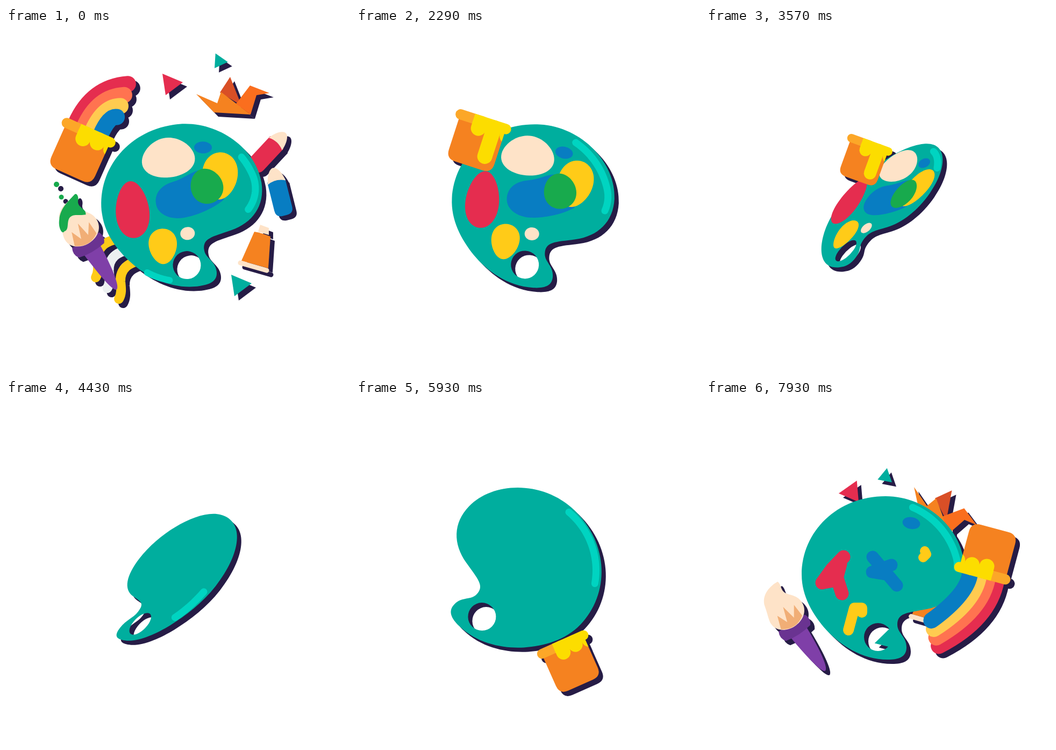
Write an HTML page with a canvas that moves like this. It is 640 px wide and 640 px high and loops after 8 s.

```html
<!DOCTYPE html>
<html lang="en">
<head>
<meta charset="utf-8">
<title>Paint palette</title>
<style>
html, body { margin: 0; width: 100%; height: 100%; overflow: hidden; background: #fff; }
canvas { display: block; width: 100vw; height: 100vh; }
</style>
</head>
<body>
<canvas id="stage" width="640" height="640"></canvas>
<script>
const ctx = document.getElementById('stage').getContext('2d');
const LOOP = 8000, RAD = Math.PI / 180, CENTER = 329;
const C = {
  ink: '#261c46', teal: '#00ae9e', shine: '#00d4c1', cream: '#fee3c8', blue: '#087dc2',
  red: '#e52d4f', yellow: '#ffcb18', green: '#18aa4d', orange: '#f58220', amber: '#fca728',
  paint: '#fcdd00', purple: '#7f3fa8', plum: '#6a3391', tan: '#f1ae76', coral: '#ff7350',
  sun: '#ffcb50', pale: '#ecf0f1', flame: '#fa6e1e', rust: '#d94f26'
};
let t = 0, late = false, inShadow = false;

const clamp = v => Math.max(0, Math.min(1, v));
const lerp = (a, b, k) => a + (b - a) * k;
const linear = (from, to) => clamp((t - from) / (to - from));
const ease = (from, to) => { const v = linear(from, to); return v * v * (3 - 2 * v); };
const bump = (from, to) => Math.sin(Math.PI * linear(from, to));

function at(x, y, deg, scale, draw) {
  ctx.save();
  ctx.translate(x, y);
  ctx.rotate(deg * RAD);
  ctx.scale(scale, scale);
  draw();
  ctx.restore();
}
function fill(color, d, rule = 'nonzero') {
  ctx.fillStyle = inShadow ? C.ink : color;
  ctx.fill(new Path2D(d), rule);
}
function line(color, width, d) {
  ctx.strokeStyle = inShadow ? C.ink : color;
  ctx.lineWidth = width;
  ctx.lineCap = ctx.lineJoin = 'round';
  ctx.stroke(new Path2D(d));
}
// An ellipse whose lower half is wider by the factor taper.
function egg(color, x, y, rx, ry = rx, taper = 0, deg = 0) {
  ctx.fillStyle = inShadow ? C.ink : color;
  at(x, y, deg, 1, () => {
    ctx.beginPath();
    for (let a = 0; a < 360; a += 6) {
      const sin = Math.sin(a * RAD);
      ctx.lineTo(rx * Math.cos(a * RAD) * (1 + taper * sin), ry * sin);
    }
    ctx.fill();
  });
}

// ---- palette ----
const PALETTE = 'M5 -151C85 -151 151 -85 151 -20C151 23 124 51 82 59C45 66 27 66 27 88C27 104 44 110 44 130' +
  'C44 148 30 153 9 153C-40 153 -80 125 -105 98C-130 70 -151 35 -151 -5C-151 -85 -85 -151 5 -151Z' +
  'M-35 111a26 26 0 1 0 52 0a26 26 0 1 0 -52 0Z';

// Width across the diagonal axis; negative shows the back.
function flip() {
  return t < 6050 ? Math.cos(Math.PI * linear(2420, 5500)) : -Math.cos(Math.PI * ease(6050, 6950));
}
function palettePose() {
  const pull = ease(4700, 5930) - ease(6050, 6950);
  return {
    x: CENTER - 18 * bump(3400, 5140) - 24 * pull,
    y: CENTER + 1 - 13 * pull,
    turn: 3 - 11.5 * (1 - linear(0, 1800)) ** 2.5
      + 57 * ease(3100, 4400) - 14 * ease(4400, 5930) - 46 * ease(6050, 6950)
  };
}
function squash(s) {
  ctx.rotate(45 * RAD);
  ctx.scale(s, 1);
  ctx.rotate(-45 * RAD);
}
function blobs() {
  egg(C.cream, -14, -92, 49, 37, .14, 2);
  egg(C.red, -94, -6, 31, 53, .14, 4);
  fill(C.blue, 'M-49 -10C-49 -32 -32 -43 -12 -46C10 -49 25 -60 40 -60L78 0C60 12 25 23 -3 23C-30 23 -49 8 -49 -10Z');
  egg(C.yellow, 76, -44, 33, 44, -.1, 14);
  egg(C.green, 49, -29, 30, 33, .08, -12);
  egg(C.yellow, -48, 70, 26, 33, -.17, 6);
  egg(C.cream, 1, 53, 13.5, 12);
}
function splats(grow) {
  const spot = (color, x, y, width, d) => at(x, y, 0, grow, () => line(color, width, d));
  spot(C.red, -89, -5, 25, 'M16 -33L-6 -10L-24 15M-2 -12L13 35M10 -20L2 10L-20 14');
  spot(C.blue, 0, -10, 23, 'M-19 -28L26 25M16 -13L-20 0L4 4');
  spot(C.yellow, -47, 58, 20, 'M8 7L8 -1L-6 -1L-17 40');
  spot(C.yellow, 78, -43, 18, 'M0 -6L3 0L-3 6');
}
function shine(from, to, turn, s, width) {
  ctx.save();
  squash(Math.abs(s));
  ctx.beginPath();
  for (let i = 0; i <= 24; i++) {
    const a = lerp(from, to, i / 24);
    const bend = a < 60 ? Math.max(0, a - turn + 15) ** 2 * .027 : 0;
    const r = 141.5 - (s > 0 ? bend : 24 * (1 + s));
    ctx.lineTo(r * Math.cos(a * RAD), r * Math.sin(a * RAD));
  }
  ctx.restore();
  ctx.strokeStyle = C.shine;
  ctx.lineWidth = width;
  ctx.lineCap = 'round';
  ctx.stroke();
}
function palette() {
  const { x, y, turn } = palettePose(), s = flip();
  const face = (width, draw) => {
    ctx.save();
    squash(width);
    ctx.rotate(turn * RAD);
    draw();
    ctx.restore();
  };
  at(x, y, 0, 1, () => {
    face(s, () => fill(C.teal, PALETTE, 'evenodd'));
    if (inShadow) return;
    const grow = late ? ease(7450, 7930) : 1;
    // The paint looks raised, so it narrows less than the board.
    if (s > 0 && grow > 0) face(s ** .7, () => {
      late ? splats(grow) : blobs();
      egg(C.blue, 53, -101, 16.5 * grow, 11 * grow, 0, 10);
    });
    const middle = -18 - 13 * ease(1000, 3300) + 83 * ease(3700, 4430) - 72 * ease(4430, 5930) - 17 * ease(6050, 7930);
    const half = (43 + 17 * ease(0, 860) - 38 * bump(2600, 5300) ** 2) / 2;
    shine(middle - half, middle + half, turn, s, 13);
    const rest = 1 - ease(0, 550);
    if (rest > 0) shine(100, 100 + 18 * rest, turn, s, 12 * rest);
  });
}

// ---- bucket with rainbow ----
function bucketPose() {
  if (late) {
    const emerge = ease(5200, 6100), swing = ease(6250, 7900);
    const angle = (66 - 79 * swing) * RAD;
    const r = 70 + 114 * emerge + 16 * swing - 70 * bump(6250, 7500);
    return [CENTER + r * Math.cos(angle), CENTER + 1 + r * Math.sin(angle), -24 - 141 * swing, .5 + .5 * emerge];
  }
  const settle = ease(0, 860), lift = ease(1500, 2290), glide = ease(2290, 3570), sink = ease(3600, 4300);
  return [
    138 - 11 * settle + 98 * lift + 69 * glide + 30 * sink,
    230 - 19 * settle + 36 * glide + 80 * sink,
    24 - 24 * settle + 18 * lift + 2 * glide,
    1 - .18 * glide - .5 * sink
  ];
}
function rainbow() {
  const grow = late ? ease(7150, 7850) : 1 - ease(0, 600);
  if (grow < .01) return;
  [C.red, C.coral, C.sun, C.blue].forEach((color, i) => {
    const x = -29 + 17 * i, y = -44;
    const [tipX, tipY] = late ? [43 + 8.5 * i, -190 + 14 * i] : [30 + 2 * i, -151 + 21.5 * i];
    const midX = lerp(x, x - (late ? 6 : 0), grow), midY = lerp(y, -119 + 12 * i, grow);
    const endX = lerp(x, tipX, grow * grow), endY = lerp(y, tipY, grow);
    line(color, 30, `M${x} ${y}Q${midX} ${midY} ${endX} ${endY}`);
  });
}
function bucket() {
  if (t > 4300 && t < 5200) return;
  const drip = late ? -28 : -28 + 50 * ease(0, 2000);
  at(...bucketPose(), () => {
    rainbow();
    fill(C.orange, 'M-45 -40H44V30Q44 48 26 48H-27Q-45 48 -45 30Z');
    line(C.amber, 19, 'M-44.5 -38.5H0');
    fill(C.paint, 'M-19 -48H44.5a9.5 9.5 0 0 1 0 19H-19Z');
    line(C.paint, 28, `M-5 -34V-24M22.5 -34V${drip}`);
    fill(C.paint, 'M36 -30Q36 -18 44 -14V-30Z');
  });
}

// ---- things that hide behind the palette ----
function brush() {
  fill(C.purple, 'M-18 44L18 44C17 90 12 132 4 136C-4 140 -11 100 -18 44Z');
  fill(C.plum, 'M-30 28H28Q34 40 26 50Q-2 56 -28 50Q-36 40 -30 28Z');
  fill(C.cream, 'M19 -51C5 -52 -20 -48 -26 -25C-30 -8 -34 0 -34 8C-34 26 -16 36 0 36' +
    'C20 36 36 24 36 6C36 -14 20 -18 18 -30C17 -38 22 -45 19 -51Z');
  fill(C.tan, 'M-24 27L-16 2L-7 22L2 -6L8 22L21 2L23 27Q0 44 -24 27Z');
  if (late) return;
  fill(C.green, 'M24 -56C12 -52 -12 -48 -24 -30C-34 -18 -34 -2 -27 -6C-18 -4 -16 -16 -8 -22' +
    'C2 -28 10 -18 23 -13C30 -22 16 -32 23 -42C29 -48 29 -57 24 -56Z');
  egg(C.green, 4, -89, 5);
  egg(C.green, 0, -64, 4.5);
}
function crane() {
  fill(C.rust, 'M-5 -39L16 14L-24 -10Z');
  fill(C.orange, 'M-68 -7L-29 10L-22 -11L33 31L-35 27Z');
  fill(C.flame, 'M32 -23L68 -9L44 -5L33 31L6 11Z');
}
const pencil = color => () => {
  fill(color, 'M-17 -22H17V32Q17 45 4 45H-4Q-17 45 -17 32Z');
  fill(C.cream, 'M-17 -18C-15 -32 -8 -46 0 -46C8 -46 15 -32 17 -18Q0 -26 -17 -18Z');
};
function tube() {
  fill(C.cream, 'M8 -49L24 -43L24 -30L4 -36Z');
  fill(C.orange, 'M-3 -36Q10 -34 27 -27L23 32L-27 18Z');
  line(C.cream, 9, 'M-29 22L20 36');
}
const triangle = color => () => fill(color, 'M-15 -19L23 -3L-9 21Z');

function items() {
  const out = late ? 1 - (1 - linear(7100, 7930)) ** 2.5 : 1 - ease(0, 780);
  if (out <= 0) return;
  const put = (draw, x, y, deg, [lateX, lateY, lateDeg] = [lerp(CENTER, x, .6), lerp(CENTER, y, .6), deg]) => {
    if (late) [x, y, deg] = [lateX, lateY, lateDeg];
    at(lerp(CENTER, x, out), lerp(310, y, out), deg + (1 - out) * 30, lerp(.4, 1, out), draw);
  };
  put(pencil(C.red), 489, 229, 43);
  put(pencil(C.blue), 508, 305, -14);
  put(tube, 465, 415, 0);
  put(crane, 422, 130, 0, [441, 204, 32]);
  put(triangle(C.red), 306, 104, 0, [271, 171, -58]);
  put(() => at(0, 0, 12, .68, triangle(C.teal)), 397, 62, 0, [334, 143, 36]);
  put(triangle(C.teal), 434, 478, 0, [337, 446, -67]);
  put(brush, 135, 370, -30, [145, 391, -33]);
}
function stripes() {
  if (t > 1750) return;
  const hide = ease(880, 1660), rise = 1 - ease(0, 700);
  [C.yellow, C.pale, C.yellow].forEach((color, i) => at(
    i * 21.5 + 4 * rise + 90 * hide, i * 20 - 13 * rise - 100 * hide, 0, 1,
    () => line(color, 18, 'M215 405C178 406 165 424 166 445C167 456 169 466 163 477')));
}

function scene() {
  stripes();
  items();
  const layers = [bucket, palette];
  if (flip() > 0) layers.reverse();
  layers.forEach(draw => draw());
}
function frame(now) {
  t = now % LOOP;
  late = t > 4300;
  ctx.fillStyle = '#fff';
  ctx.fillRect(0, 0, 640, 640);
  inShadow = true;
  at(8, 8, 0, 1, scene);
  inShadow = false;
  scene();
  requestAnimationFrame(frame);
}
requestAnimationFrame(frame);
</script>
</body>
</html>
```
